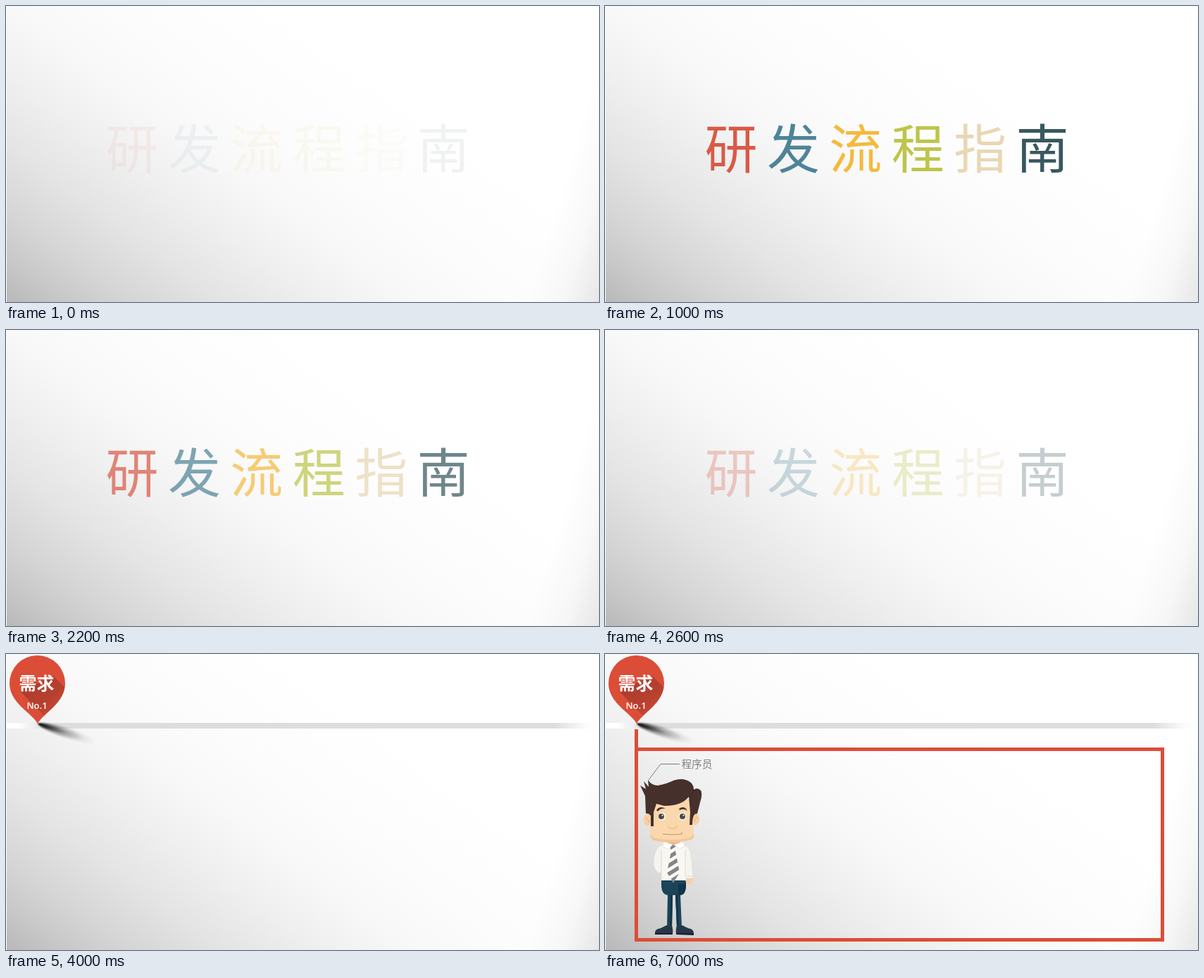
An HTML page for the animation above (8000 ms loop, 842 px wide and 421 px high).

```html
<!DOCTYPE html>
<html lang="zh-CN">
<head>
<meta charset="utf-8">
<title>研发流程指南</title>
<style>
  html, body { margin: 0; width: 100%; height: 100%; overflow: hidden; background: #fff; }
  svg { display: block; width: 842px; height: 421px; }
  text { font-family: "Noto Sans CJK SC", "Noto Sans CJK", "Noto Sans", sans-serif; }

  .title, .track, .pin, .panel, .man, .label { animation: 8s step-end infinite; }
  .title { animation-name: title; font-size: 75px; letter-spacing: 13.4px; }
  .track { animation-name: track; }
  .pin { animation-name: pin; }
  .panel { animation-name: panel; }
  .man { animation-name: man; }
  .label { animation-name: label; }

  /* one step every 200 ms while fading */
  @keyframes title {
    0% { opacity: .07 }
    2.5% { opacity: .27 }
    5% { opacity: .47 }
    7.5% { opacity: .66 }
    10% { opacity: .86 }
    12.5% { opacity: 1 }
    25% { opacity: .93 }
    27.5% { opacity: .72 }
    30% { opacity: .5 }
    32.5% { opacity: .29 }
    35% { opacity: .08 }
    37.5%, 100% { opacity: 0 }
  }
  @keyframes track { 0% { opacity: 0 } 43.75%, 100% { opacity: 1 } }
  @keyframes pin { 0% { opacity: 0 } 50%, 100% { opacity: 1 } }
  @keyframes panel { 0% { opacity: 0 } 75%, 100% { opacity: 1 } }
  @keyframes man { 0% { opacity: 0 } 81.25%, 100% { opacity: 1 } }
  @keyframes label { 0% { opacity: 0 } 87.5%, 100% { opacity: 1 } }
</style>
</head>
<body>
<svg viewBox="0 0 842 421" xmlns="http://www.w3.org/2000/svg">
  <defs>
    <linearGradient id="corner" gradientUnits="userSpaceOnUse" x1="0" y1="421" x2="332" y2="-40">
      <stop offset="0" stop-color="#b8b8b8"/>
      <stop offset=".09" stop-color="#c8c8c8"/>
      <stop offset=".18" stop-color="#d5d5d5"/>
      <stop offset=".32" stop-color="#e4e4e4"/>
      <stop offset=".46" stop-color="#efefef"/>
      <stop offset=".6" stop-color="#f8f8f8"/>
      <stop offset=".75" stop-color="#fcfcfc"/>
      <stop offset="1" stop-color="#fff"/>
    </linearGradient>
    <linearGradient id="side" gradientUnits="userSpaceOnUse" x1="740" y1="421" x2="834" y2="448">
      <stop offset="0" stop-opacity="0"/>
      <stop offset=".5" stop-opacity=".025"/>
      <stop offset="1" stop-opacity=".09"/>
    </linearGradient>
    <linearGradient id="bar" gradientUnits="userSpaceOnUse" x1="0" y1="0" x2="842" y2="0">
      <stop offset=".02" stop-color="#fff"/>
      <stop offset=".07" stop-color="#dcdede"/>
      <stop offset=".925" stop-color="#dcdede"/>
      <stop offset=".975" stop-color="#fafafa"/>
      <stop offset="1" stop-color="#fff"/>
    </linearGradient>
    <radialGradient id="shade" fx=".05" fy=".5">
      <stop offset="0" stop-opacity=".95"/>
      <stop offset=".2" stop-opacity=".72"/>
      <stop offset=".5" stop-opacity=".3"/>
      <stop offset=".8" stop-opacity=".06"/>
      <stop offset="1" stop-opacity="0"/>
    </radialGradient>
    <linearGradient id="cast" gradientUnits="userSpaceOnUse" x1="45" y1="42" x2="75" y2="76">
      <stop offset="0" stop-opacity=".2"/>
      <stop offset=".6" stop-opacity=".17"/>
      <stop offset="1" stop-opacity=".08"/>
    </linearGradient>
    <path id="drop" d="M45 99C36 83 5 70 5 41.5A39.5 39.5 0 0 1 84 41.5C84 70 54 83 45 99Z"/>
    <clipPath id="inDrop"><use href="#drop"/></clipPath>
    <path id="tie" d="M92 274L97 271L101 274L100 280L106 311L97 325L88 311L94 280Z"/>
    <clipPath id="inTie"><use href="#tie"/></clipPath>
  </defs>

  <rect x="1" width="841" height="421" fill="url(#corner)"/>
  <rect x="1" width="841" height="421" fill="url(#side)"/>

  <text class="title" x="141.5" y="231"><tspan fill="#d95a47">研</tspan><tspan fill="#4e8497">发</tspan><tspan fill="#f5b93f">流</tspan><tspan fill="#bdc54b">程</tspan><tspan fill="#e9d7b3">指</tspan><tspan fill="#38585f">南</tspan></text>

  <rect class="track" x="1" y="98" width="841" height="8" fill="url(#bar)"/>

  <g class="pin">
    <ellipse cx="85" cy="112" rx="44" ry="9" transform="rotate(18 85 112)" fill="url(#shade)"/>
    <use href="#drop" fill="#dc4d38"/>
    <path d="M67 31L92 56V100H66L20 53Z" fill="url(#cast)" clip-path="url(#inDrop)"/>
    <g fill="#fff" text-anchor="middle">
      <text x="43.5" y="50.5" font-size="25" font-weight="700">需求</text>
      <text x="44" y="78" font-size="13" font-weight="600" style="font-family:'Open Sans',sans-serif">No.1</text>
    </g>
  </g>

  <path class="panel" d="M44.5 107V406.5H791.5V135.5H44.5" fill="none" stroke="#dc4d38" stroke-width="5"/>

  <g class="man">
    <!-- legs and shoes -->
    <path d="M80 321H115V331Q114 343 107 343L109 389H102L100 343H96L95 389H88L89 343Q81 342 80 331Z" fill="#1b4459"/>
    <path d="M104 328V343H107Q114 343 115 331V326ZM93 343H96L95 389H92ZM100 343H103L105 389H102Z" fill="#12344a"/>
    <path d="M71 398Q70 391 79 390L87 386H95Q97 393 96 398ZM126 399Q127 391 118 390L110 386H102Q100 393 101 398Z" fill="#26364a"/>
    <path d="M71 397H96V399H71ZM101 397H126V400L101 399Z" fill="#18212d"/>
    <!-- shirt and arms -->
    <path d="M114 317H125Q126 326 120 328Q115 327 114 321Z" fill="#f8cfa3"/>
    <path d="M83 272Q71 272 69 295Q68 306 77 312L82 307L79 298L85 285ZM111 272Q122 272 123 293L125 319H114L111 288Z" fill="#f5f4ef" stroke="#dddcd5" stroke-width=".8"/>
    <path d="M80 273Q96 262 114 273L115 322H80Z" fill="#f8f7f2"/>
    <path d="M80 279V321M114 279V317M114 316H125" fill="none" stroke="#dcdbd4"/>
    <path d="M89 265H106V271H89Z" fill="#eab988"/>
    <use href="#tie" fill="#fafafa"/>
    <path d="M84 281L108 266M84 293L108 278M84 305L108 290M84 317L108 302M84 329L108 314" stroke="#858585" stroke-width="5.5" clip-path="url(#inTie)"/>
    <path d="M83 267L96 271L90 278L82 274ZM111 267L99 271L105 278L113 273Z" fill="#fff" stroke="#deddd6" stroke-width=".7"/>
    <!-- head -->
    <g fill="#f8cfa3">
      <ellipse cx="60.5" cy="236" rx="6" ry="8.5"/>
      <ellipse cx="128.5" cy="235" rx="5.5" ry="8.5"/>
      <path d="M65 207H124V240Q129 261 122 264Q96 271 69 265Q61 262 65 241Z" fill="#fbd7ad"/>
    </g>
    <path d="M58 233Q62 235 62 240M131 232Q127 235 127 239" fill="none" stroke="#e9b282"/>
    <path d="M65 255Q66 262 77 263Q98 266 118 262Q125 260 125 254Q128 262 122 264Q96 271 69 265Q63 262 65 255Z" fill="#f4c594"/>
    <path d="M57 202L50 187L58 192L55 181L62 189L61 179Q66 187 75 187Q87 185 97 180Q112 175 122 183Q126 187 126 193Q131 189 136 194Q139 199 135 211L131 227Q124 226 124 243H120L121 225L119 203Q109 216 84 216L73 213L69 225V245H65V230Q62 226 58 227Z" fill="#46302b"/>
    <path d="M119 203Q126 199 126 193" fill="none" stroke="#33211e"/>
    <path d="M73 222Q78 215 86 220Q79 219 75 224ZM105 220Q113 215 117 223Q112 219 106 222Z" fill="#46302b"/>
    <circle cx="81" cy="231" r="5.5" fill="#fff3df"/>
    <circle cx="110" cy="231" r="5.5" fill="#fff3df"/>
    <circle cx="80" cy="231" r="4" fill="#424a4c"/>
    <circle cx="110" cy="231" r="4" fill="#424a4c"/>
    <circle cx="81.5" cy="229.5" r="1.1" fill="#fff"/>
    <circle cx="111.5" cy="229.5" r="1.1" fill="#fff"/>
    <ellipse cx="96" cy="245" rx="7" ry="5" fill="#f5c799"/>
    <ellipse cx="96" cy="242.5" rx="6" ry="4.5" fill="#fbd7ad"/>
    <path d="M82 256Q96 258 109 256V253" fill="none" stroke="#c99566"/>
  </g>

  <g class="label">
    <path d="M62 179L79 156.5H106" fill="none" stroke="#7b7b80"/>
    <text x="108.5" y="161.5" font-size="14.6" fill="#808080">程序员</text>
  </g>
</svg>
</body>
</html>
```
